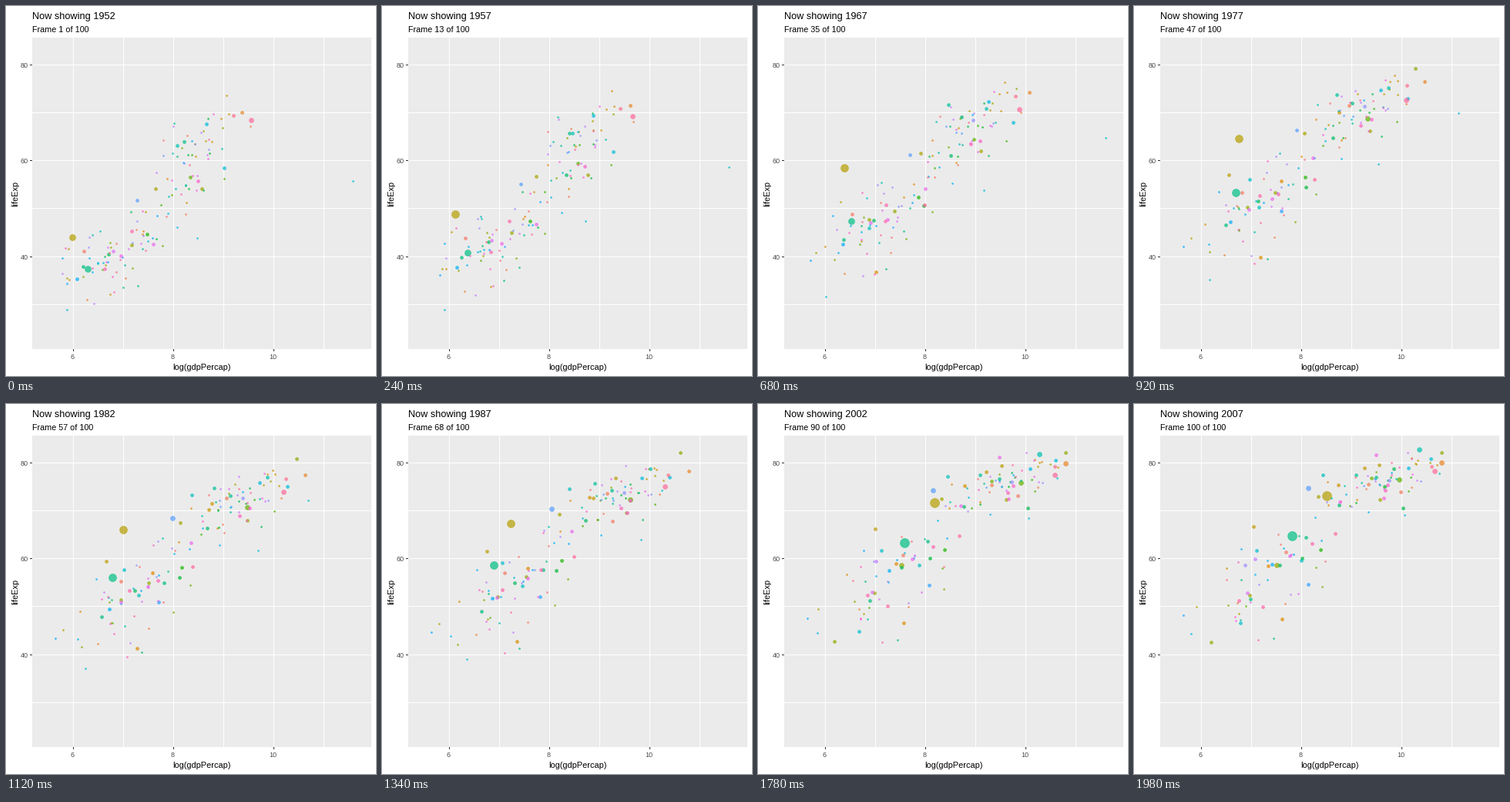
These frames come from a looping animation (480x480 px, 2 s). A matplotlib script:

```python
import matplotlib.pyplot as plt
import numpy as np
from matplotlib.animation import FuncAnimation

SIZE, DPI, FRAMES, INTERVAL = 480, 100, 100, 20
PX = 72 / DPI
STATES, DOTS = 12, 142
LEFT, RIGHT, TOP, BOTTOM = 34, 474, 41, 445

# Lengths in frames of hold, move, hold, move, ... hold
ENDS = np.cumsum([5] * 7 + [4] * 3 + [5] + [4] * 12)

# Colour rank, population in millions, x and y at the states in KNOTS
KNOTS = (0, 4, 7, 11)
LEADS = [
    (25, 1319, (5.99, 6.52, 7.23, 8.51), (44, 63.1, 67.3, 73)),
    (59, 1110, (6.30, 6.59, 6.89, 7.81), (37.4, 50.7, 58.6, 64.7)),
    (67, 127, (8.08, 9.60, 10.02, 10.36), (63, 73.4, 78.7, 82.6)),
    (72, 2.5, (11.59, 11.60, 10.24, 10.76), (55.6, 67.7, 74.2, 77.6)),
    (135, 301, (9.55, 9.99, 10.31, 10.67), (68.4, 71.3, 75, 78.2)),
]

# Count, median population; then (first, last) of mean x, sd x, mean y, sd y
CLOUDS = [
    (52, 9, (6.90, 7.47), (0.60, 0.95), (39, 54.8), (5, 9)),
    (24, 8, (8.15, 9.05), (0.50, 0.55), (53, 73.6), (8.5, 4)),
    (29, 14, (7.40, 8.95), (0.95, 1.05), (46.5, 71), (8.5, 6.5)),
    (32, 10, (8.60, 10.05), (0.55, 0.50), (65, 77.7), (5.5, 2.7)),
]
CORRELATION = 0.7

states = np.arange(STATES)
progress = states / (STATES - 1)
eased = 1 - (1 - progress) ** 1.6


def hcl(h, c=100, l=65):
    """Polar LUV colour as clipped sRGB."""
    a = np.radians(h)
    u = c * np.cos(a) / (13 * l) + 0.1978
    v = c * np.sin(a) / (13 * l) + 0.4683
    y = ((l + 16) / 116) ** 3
    xyz = np.array([9 * y * u / (4 * v), y, y * (12 - 3 * u - 20 * v) / (4 * v)])
    m = np.array([[3.2406, -1.5372, -0.4986],
                  [-0.9689, 1.8758, 0.0415],
                  [0.0557, -0.2040, 1.0570]])
    lin = np.clip(m @ xyz, 0, 1)
    return np.where(lin > 0.0031308, 1.055 * lin ** (1 / 2.4) - 0.055, 12.92 * lin)


def to_x(v):
    return 87.44 + 65 * (v - 6)


def to_y(v):
    return 325 - 6.2246 * (v - 40)


def wander(rng):
    """A standard score that drifts slowly from state to state."""
    a, b = np.clip(rng.normal(size=2), -1.7, 1.7)
    turn = 0.7 * progress
    return a * np.cos(turn) + b * np.sin(turn)


def build():
    """Rows of (rank, population, xs, ys), sorted by rank."""
    rng = np.random.default_rng(52)
    rows = [(rank, pop, np.interp(states, KNOTS, xs), np.interp(states, KNOTS, ys))
            for rank, pop, xs, ys in LEADS]
    used = {row[0] for row in rows}
    free = list(rng.permutation([r for r in range(1, DOTS + 1) if r not in used]))
    for count, median, *spans in CLOUDS:
        mx, sx, my, sy = (a + (b - a) * eased for a, b in spans)
        for _ in range(count):
            zx = wander(rng)
            zy = CORRELATION * zx + np.sqrt(1 - CORRELATION ** 2) * wander(rng)
            pop = min(median * np.exp(rng.normal(0, 1.2)), 200)
            rows.append((free.pop(), pop, np.clip(mx + sx * zx, 5.65, 10.8),
                         np.clip(my + sy * zy, 28.8, 82)))
    return sorted(rows, key=lambda row: row[0])


ranks, pops, xs, ys = (np.array(col) for col in zip(*build()))
xs, ys = to_x(xs), to_y(ys)
colors = [hcl(15 + 360 * (r - 1) / DOTS) for r in ranks]
growth = 2.4 ** (progress - 1)
scales = 1 + 5 * np.sqrt(pops[:, None] * growth / pops.max())


def phase(i):
    """Position on the state axis at step i."""
    seg = int(np.searchsorted(ENDS, i, side="right"))
    if seg % 2 == 0:
        return seg // 2
    start, end = ENDS[seg - 1], ENDS[seg]
    return seg // 2 + (i - start + 1) / (end - start)


def between(values, t):
    k = min(int(t), STATES - 2)
    return values[:, k] + (values[:, k + 1] - values[:, k]) * (t - k)


fig = plt.figure(figsize=(SIZE / DPI, SIZE / DPI), dpi=DPI, facecolor="white")
ax = fig.add_axes([0, 0, 1, 1])
ax.set_xlim(0, SIZE)
ax.set_ylim(SIZE, 0)
ax.axis("off")


def box(x, y, w, h, color):
    ax.add_patch(plt.Rectangle((x, y), w, h, fc=color, ec="none", lw=0, zorder=1))


def label(x, y, text, size, color="black", **kw):
    return ax.text(x, y, text, fontsize=size * PX, family="Liberation Sans",
                   color=color, **kw)


box(LEFT, TOP, RIGHT - LEFT, BOTTOM - TOP, "#EBEBEB")
for v in range(6, 12):
    x = int(to_x(v))
    box(x, TOP, 1, BOTTOM - TOP, "white")
    if v % 2 == 0:
        box(x, BOTTOM, 1, 3, "#333333")
        label(x - 0.5, 458.5, str(v), 9, "#4D4D4D", ha="center")
for v in range(30, 81, 10):
    y = int(to_y(v))
    box(LEFT, y, RIGHT - LEFT, 1, "white")
    if v % 20 == 0:
        box(LEFT - 3, y, 3, 1, "#333333")
        label(29, y + 4, str(v), 9, "#4D4D4D", ha="right")

label(254, 472, "log(gdpPercap)", 11, ha="center")
label(12, 243, "lifeExp", 11, ha="center", va="center", rotation=90)
title = label(33.5, 17, "", 12.8)
subtitle = label(33.5, 34, "", 10.8)

dots = ax.scatter(xs[:, 0], ys[:, 0], c=colors, alpha=0.7, zorder=2)
dots.set_edgecolor(dots.get_facecolor())
dots.set_edgecolor([(*c, 0.7) for c in colors])
dots.set_linewidth(0.6 * PX)


def draw(i):
    t = phase(i)
    centres = np.column_stack([between(xs, t), between(ys, t)])
    radius = np.floor(0.375 * (2.845 * between(scales, t) + 0.945))
    dots.set_offsets(np.floor(centres) + 0.5)
    dots.set_sizes((2 * radius * PX) ** 2)
    title.set_text(f"Now showing {1952 + 5 * int(t + 0.5)}")
    subtitle.set_text(f"Frame {i + 1} of {FRAMES}")
    return dots, title, subtitle


anim = FuncAnimation(fig, draw, frames=FRAMES, interval=INTERVAL,
                     repeat=True, repeat_delay=0, blit=False)
plt.show()
```
